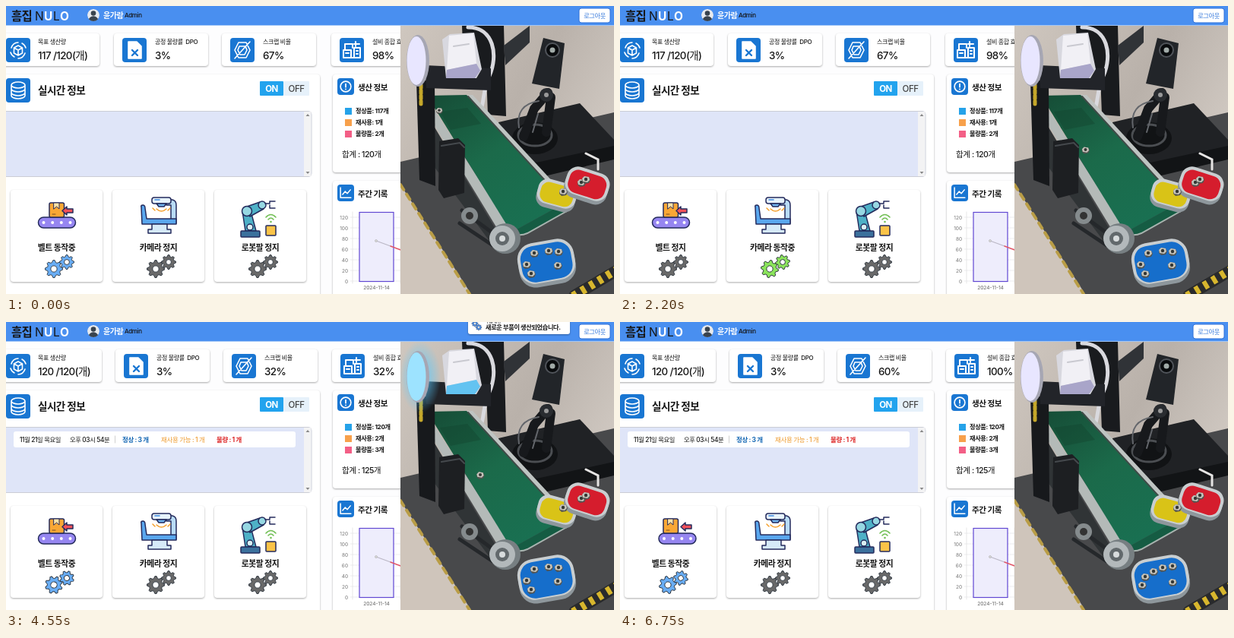
Recreate the animation shown at these times as an HTML page. Size 800 by 379 pixels, loop 6800 ms.

```html
<!DOCTYPE html>
<html lang="ko">
<head>
<meta charset="utf-8">
<style>
html, body { margin: 0; height: 100%; overflow: hidden; background: #fdfdfe; }
svg { display: block; width: 100vw; height: 100vh; }
text { font-family: Inter, "Noto Sans CJK KR", "Noto Sans CJK", sans-serif; letter-spacing: -.045em; fill: #161616; font-weight: 500; }
.b { font-weight: 700; }
.m { text-anchor: middle; }
.axis { font-size: 6.5px; fill: #777; text-anchor: end; letter-spacing: 0; font-weight: 400; }
.card { fill: #fff; filter: drop-shadow(0 1px 1.2px #0005); }
.w { fill: none; stroke: #fff; stroke-width: 1.6; stroke-linejoin: round; stroke-linecap: round; }
.ink { stroke: #242b5c; stroke-width: 1.5; stroke-linejoin: round; stroke-linecap: round; }
</style>
</head>
<body>
<svg id="stage" viewBox="0 0 800 379" preserveAspectRatio="none"></svg>
<script>
const $ = id => document.getElementById(id);
const text = (x, y, size, str, cls = '', extra = '') =>
  `<text x="${x}" y="${y}" font-size="${size}" class="${cls}" ${extra}>${str}</text>`;
const rect = (x, y, w, h, r = 0, attrs = '') =>
  `<rect x="${x}" y="${y}" width="${w}" height="${h}" rx="${r}" ${attrs}/>`;
const path = (d, attrs) => `<path d="${d}" ${attrs}/>`;
const poly = (points, fill, attrs = '') => `<polygon points="${points}" fill="${fill}" ${attrs}/>`;
const dot = (x, y, r, fill, attrs = '') => `<circle cx="${x}" cy="${y}" r="${r}" fill="${fill}" ${attrs}/>`;
const line = (d, color, width, attrs = '') =>
  path(d, `fill="none" stroke="${color}" stroke-width="${width}" stroke-linecap="round" ${attrs}`);
const tile = (x, y, s, glyph) =>
  rect(x, y, s, s, 4, 'fill="#1976d2"') + `<g class="w" transform="translate(${x + s / 2} ${y + s / 2}) scale(${s / 32})">${glyph}</g>`;

function gear(r, teeth) {
  let d = '';
  for (let i = 0; i < teeth * 4; i++) {
    const a = (i - .5) / teeth * Math.PI / 2, k = i % 4 < 2 ? r : r * .76;
    d += `${i ? 'L' : 'M'}${(k * Math.cos(a)).toFixed(2)} ${(k * Math.sin(a)).toFixed(2)}`;
  }
  return path(d + 'Z', 'fill="currentColor" stroke="#29313b" stroke-width=".9"') +
    dot(0, 0, r * .36, '#fff', 'stroke="#29313b" stroke-width=".9"');
}
const gears = (id, x) => `<g id="${id}"><g transform="translate(${x - 4} 346)"><g class="spin">${gear(11.5, 8)}</g></g>
  <g transform="translate(${x + 13} 337)"><g class="spin back">${gear(9.5, 8)}</g></g></g>`;

// Header bar
const header = rect(0, 0, 800, 25.5, 0, 'fill="#498ff0"') +
  text(7, 19, 15.5, '흠집', 'b') + text(38, 18.5, 15.5, 'N', '', 'style="font-weight:400"') +
  text(50, 18.5, 15.5, 'U', 'b', 'style="fill:#fff"') + text(62, 18.5, 15.5, 'L', '', 'style="font-weight:400"') +
  text(71, 18.5, 15.5, 'O', 'b', 'style="fill:#fff"') +
  `<g clip-path="url(#face)">${dot(115, 12, 8, '#e8eaee')}${dot(115, 9.5, 3.3, '#39434e')}<ellipse cx="115" cy="19" rx="6.3" ry="5.7" fill="#39434e"/></g>` +
  text(128, 15.5, 10, '윤가람', 'b', 'style="fill:#fff"') + text(156, 15, 8, 'Admin') +
  rect(754, 3, 41, 19, 3, 'fill="#fff" stroke="#2f71d8"') + text(774.5, 15.5, 8.2, '로그아웃', 'm', 'style="fill:#3478db"');

// Summary cards
const glyphs = [
  path('M0-6L5.5-3V4L0 7L-5.5 4V-3ZM-5.5-3L0 0L5.5-3M0 0V7M-9-3A10 10 0 0 1 0-10M9 4A10 10 0 0 1 0 11M-10 3A10 10 0 0 0-5 9M10-3A10 10 0 0 0 5-9', ''),
  path('M-8-11H3L9-5V11H-8Z', 'fill="#fff"') + path('M-3 0L4 7M4 0L-3 7', 'stroke="#1976d2" stroke-width="2.4"'),
  path('M-5-10H5L10 0L5 10H-5L-10 0ZM-4-5L4-5L6 0L3 6H-3L-6 0ZM10-11L-10 11', ''),
  path('M-11 10V0H-1V10ZM-1 10H11V-3H3V10M-9 0V-8H1V-3M3-8H10M5-11V-5M-8 4H-4M6 1H8M6 5H8', 'stroke-width="2"')
];
const labels = ['목표 생산량', '공정 불량률 &#160;DPO', '스크랩 비율', '설비 종합 효율'];
const summary = [0, 153, 295, 439].map((x, i) => `<g class="sum">${
  rect(i ? x - 11 : -6, 36, i ? 124 : 129, 43, 4, `class="card" ${i ? '' : 'id="first"'}`) + tile(x, 42, 32, glyphs[i]) +
  text(x + (i ? 43 : 42), 50, 8, labels[i]) + text(x + (i ? 43 : 42), 70, 13.4, '', '', `id="val${i}"`)}</g>`).join('');

// Live panel
const live = rect(-6, 90, 419, 300, 4, 'class="card"') +
  tile(0, 95, 32, path('M-9-7A9 4 0 0 1 9-7A9 4 0 0 1-9-7V7A9 4 0 0 0 9 7V-7M-9-2A9 4 0 0 0 9-2M-9 3A9 4 0 0 0 9 3', '')) +
  text(42, 116, 13.6, '실시간 정보', 'b') +
  rect(334, 99, 31, 19, 1, 'fill="#22a3ee"') + rect(365, 99, 34, 19, 1, 'fill="#e6f1fa"') +
  text(349.5, 113, 11.5, 'ON', 'm b', 'style="fill:#fff"') + text(382, 113, 11.5, 'OFF', 'm', 'style="fill:#444"') +
  rect(-4, 138.5, 406, 86, 4, 'fill="#dfe5f8" stroke="#cbcdd5"') + rect(392, 139, 9.5, 85, 0, 'fill="#f3f3f4"') +
  path('M394.5 145L397 142L399.5 145ZM394.5 218L397 221L399.5 218Z', 'fill="#888"') +
  `<g id="log">${rect(10, 144, 371, 21, 3, 'fill="#fff"') + text(18, 157.5, 8.3, '11월 21일 목요일') + text(84, 157.5, 8.3, '오후 03시 54분') +
    line('M143.5 150V159', '#bbb', .7) + text(153, 157.5, 8.5, '정상 : 3 개', 'b', 'style="fill:#1769b5"') +
    text(204, 157.5, 8.5, '재사용 가능 : 1 개', '', 'style="fill:#ee9a2d"') + text(277, 157.5, 8.5, '불량 : 1 개', 'b', 'style="fill:#dd2828"')}</g>`;

// Device icons
const roller = (x, y) => rect(x, y, 49, 14, 7, 'class="ink" fill="#9686f1"') +
  [7, 18.7, 30.3, 42].map(dx => dot(x + dx, y + 7, 2, '#fff')).join('');
const beltIcon = `<g clip-path="url(#beltbox)"><g id="upper">${roller(42.5, 278)}</g><g id="lower">${roller(24, 290.5)}</g>
  <g id="parcel" class="ink">${rect(57, 259, 19.5, 19, 2, 'fill="#f9a735"') + path('M63 259H70V267L66.5 264L63 267Z', 'fill="#fde3a7" stroke-width="1"') + line('M61 274H65', '#7a4f23', 1)}</g>
  <g id="arrow">${path('M74 269.5L80 264V267H88V272H80V275Z', 'class="ink" fill="#f2515a" stroke-width="1.2"')}</g></g>`;
const cameraIcon = `<g class="ink">${path('M211 255H219Q224 256 224 262V286H217V262H211Z', 'fill="#b9dcf6"') +
  path('M178 265Q177 262 180 262Q183 262 183 266L185 280H224V287H179Z', 'fill="#5aa7ee"') +
  path('M192 287H212V294H217V299H187V294H192Z', 'fill="#d6eaf8"')}
  <g id="head">${rect(192, 252, 25, 8, 3, 'fill="#e7f3fc"') + path('M198 260H211L208 264H201Z', 'fill="#72b7f1"') + line('M196 255H202', '#3e8be0', 1.6)}</g></g>
  <g id="rays">${line('M198 267Q204.500 273 211 267M193 266L196 269M216 266L213 269', '#f5a02b', 1.5)}</g>`;
const armIcon = `<g class="ink">${path('M315 296L311 270L321 266L329 296Z', 'fill="#4eb1c7"') +
  path('M314 265L334 258L339 267L321 277Z', 'fill="#4eb1c7"') + dot(317, 270, 6.5, '#96d7e2') + dot(337, 262, 5, '#96d7e2') +
  path('M341 260H347V257H354M347 262V266H354', 'fill="none"') + rect(309, 296, 25, 8, 1, 'fill="#3b719d"') +
  dot(321, 291, 4, '#d9eff2') + rect(342, 289, 13, 13, 1, 'fill="#fbc348"')}</g>` +
  line('M342 278Q348.500 271 355 278M345 281Q348.500 277 352 281', '#72bf55', 1.6) + dot(348.500, 284, 1.3, '#72bf55');
const devices = [66.5, 200.5, 334.5].map((x, i) => rect(x - 60.5, 242, 121, 121, 4, 'class="card"') +
  [beltIcon, cameraIcon, armIcon][i] + text(x, 322, 10.8, '', 'm b', `id="state${i}"`) + gears('gear' + i, x + .5)).join('');

// Production and chart panels
const legend = [['#25a2e9', 139], ['#f7a04b', 154], ['#f35f86', 169]].map(([color, y], i) =>
  rect(446, y - 5, 9, 9, 0, `fill="${color}"`) + text(460, y + 2, 8.2, '', 'b', `id="count${i}"`)).join('');
const panels = rect(430, 90, 130, 129, 4, 'class="card"') +
  tile(436, 95, 22, dot(0, 0, 10, 'none', 'stroke-width="2.4"') + path('M0-5V1M0 5V5.1', 'stroke-width="2.6"')) +
  text(463, 111, 10.6, '생산 정보', 'b') + legend + text(442, 199, 10.6, '', '', 'id="total"') +
  rect(430, 230, 130, 160, 4, 'class="card"') + tile(436, 235, 22, path('M-10-10V9H10M-6 3L-1-3L3 1L9-6', 'stroke-width="2.2"')) +
  text(463, 251, 10.6, '주간 기록', 'b') +
  [...Array(7).keys()].map(i => {
    const y = 362 - i * 14;
    return line(`M453 ${y}H519`, '#e5e5e8', .7) + text(450, y + 2.5, 6.5, i * 20, 'axis');
  }).join('') + line('M456 271V365M519 271V365', '#ddd', .7) +
  rect(465, 271.5, 45, 91, 0, 'fill="#eeedfc" stroke="#6047d2" stroke-width="1.2"') +
  line('M487 309L506 316', '#bbb8c6', 1.3) + line('M506 316L522 322', '#e25163', 1.4) + dot(487, 309, 1.5, '#ddd', 'stroke="#aaa" stroke-width=".6"') +
  text(487.500, 373, 6.5, '2024-11-14', 'm', 'style="fill:#777;letter-spacing:0"');

// Workbench picture
const nut = (x, y) => `<use href="#nut" x="${x}" y="${y}"/>`;
const tray = (x, y, w, h, color, turn) => `<g transform="translate(${x} ${y}) rotate(${turn})">${
  rect(-w / 2, -h / 2 + 5, w, h, h * .4, 'fill="#8e979c"') + rect(-w / 2, -h / 2, w, h, h * .4, 'fill="#c9ced0"') +
  rect(-w / 2 + 4, -h / 2 + 4, w - 8, h - 6, h * .32, `fill="${color}"`)}</g>`;
const bench = `<g clip-path="url(#photo)">` + rect(519, 26, 281, 353, 0, 'fill="url(#wall)"') +
  poly('519,205 800,140 800,379 607,379 519,236', '#48494b') + poly('519,235 612,379 519,379', '#cfc5bb') +
  line('M519 235L610 379', '#b99d46', 4, 'stroke-dasharray="8 7"') +
  line('M748 381L802 349', '#292a2c', 15) + line('M746 382L804 347', '#d7b62e', 11, 'stroke-dasharray="6 7" style="stroke-linecap:butt"') +
  poly('648,153 755,128 800,176 800,196 698,218 650,182', '#202225') + poly('650,181 698,206 800,184 800,202 700,226 650,194', '#121416') +
  line('M763 194L779 202V215', '#e6e5e4', 3) +
  poly('600,26 655,26 658,145 634,143 632,90 602,77', '#191b1e') + poly('655,52 689,26 689,48 657,78', '#303337') +
  `<ellipse cx="696" cy="174" rx="30" ry="21" fill="#111315"/><ellipse cx="696" cy="170" rx="22" ry="14" fill="none" stroke="#4b4e52" stroke-width="3"/>` +
  line('M681 172L695 135L713 114M711 166L717 120', '#17191c', 12) + line('M675 160Q670 130 701 125M693 166L700 142', '#63666b', 2) +
  dot(711, 117, 9, '#292c30') + dot(711, 117, 3, '#999') +
  poly('707,42 735,49 728,109 692,102', '#222529') + dot(719, 58, 9, '#090b0d', 'stroke="#50545a" stroke-width="2"') + dot(719, 58, 3.5, '#a1aba8') +
  line('M608 28C642 28 648 65 636 92S632 137 617 142', '#d9d9de', 5) +
  poly('549,133 558,128 667,298 658,312', '#b4bab8') + poly('554,143 651,305 639,313 557,203', '#303436') +
  poly('603,117 614,117 746,260 737,272', '#bfc4c2') + poly('554,118 606,117 736,259 665,298', 'url(#belt)') +
  line('M608 119L738 261', '#3e4b47', 2) +
  poly('571,139 607,134 625,155 585,163', '#12452f', 'opacity=".45"') +
  path('M665 298Q675 304 686 299L736 271Q743 266 736 259', 'fill="#155c43" stroke="#a9b4b0" stroke-width="2"') +
  poly('540,98 564,98 565,237 544,229', '#17191c') + line('M546 104V132', '#c4a72a', 5, 'stroke-dasharray="4 3"') +
  poly('551,78 638,82 638,111 553,108', '#222429') + poly('570,178 595,174 604,183 603,246 576,253 569,242', '#1d1f22') + line('M573 184L597 180L603 186', '#45494d', 2) +
  line('M600 269L638 297M597 286L645 318', '#25282b', 5) + dot(610, 276, 11, '#858b8d') + dot(610, 276, 5, '#333') +
  dot(657, 306, 20, '#777f82') + dot(653, 306, 17, '#b3b9bb') + dot(653, 306, 9, '#62696c') + dot(653, 306, 4, '#d8dcdd') +
  `<ellipse id="glow" cx="545" cy="72" rx="27" ry="48" fill="url(#halo)"/>
  <ellipse cx="542" cy="72" rx="15" ry="34" fill="#a6a6b3"/><ellipse id="ring" cx="540" cy="72" rx="12.5" ry="32"/>` +
  poly('574,44 584,37 616,35 626,83 619,95 579,95', '#d8d8df') + poly('583,39 615,36 619,76 580,84', '#f1f0f5') +
  poly('580,84 619,76 624,85 617,95 579,95', '#a9a5c9', 'id="lens"') + line('M589 53L609 50', '#c9c9d0', 2) +
  tray(725, 247, 52, 33, '#d9c317', 15) + tray(765, 234, 58, 37, '#d51d2d', 18) + tray(711, 336, 75, 54, '#166ecb', -10) +
  nut(733, 245) + nut(757, 233) + nut(763, 229) +
  `<g id="before">${nut(695, 326) + nut(714, 323) + nut(727, 324) + nut(685, 341) + nut(691, 353) + nut(726, 342)}</g>
  <g id="after">${nut(691, 336) + nut(702, 329) + nut(714, 324) + nut(727, 322) + nut(687, 347) + nut(727, 343)}</g>` +
  `<g id="part">${nut(0, 0)}</g></g>`;

const toast = `<g id="toast">${rect(608, 1, 134, 23, 3, 'class="card"')}<g color="#4d8fe8"><g transform="translate(617 10) scale(.38)">${gear(11, 8)}</g><g transform="translate(622 15) scale(.4)">${gear(10, 8)}</g></g>${
  text(631, 8.5, 5.5, '부품 생산') + text(631, 18, 8.2, '새로운 부품이 생산되었습니다.', 'b')}</g>`;

$('stage').innerHTML = `<defs>
  <clipPath id="photo">${rect(519, 26, 281, 353)}</clipPath><clipPath id="face">${dot(115, 12, 8, '')}</clipPath>
  <clipPath id="beltbox">${rect(32.5, 250, 69, 58)}</clipPath>
  <linearGradient id="wall" x2="1" y2=".7"><stop stop-color="#cfc7bf"/><stop offset=".5" stop-color="#b9b1aa"/><stop offset="1" stop-color="#dad3cc"/></linearGradient>
  <linearGradient id="belt" x2=".7" y2="1"><stop stop-color="#164c36"/><stop offset=".5" stop-color="#1b6a4a"/><stop offset="1" stop-color="#197052"/></linearGradient>
  <radialGradient id="halo"><stop offset=".4" stop-color="#58caff" stop-opacity=".8"/><stop offset="1" stop-color="#58caff" stop-opacity="0"/></radialGradient>
  <g id="nut">${poly('-5,-2 -2,-5 4,-4 6,0 4,4 -2,5 -5,2', '#535451')}${poly('-5,-2 -2,-5 4,-4 5,0 2,3 -4,2', '#c6c4bb')}${dot(0, -1, 2.2, '#343734')}</g>
  </defs>` + rect(0, 0, 800, 379, 0, 'fill="#fdfdfe"') + summary + live + devices + panels + header + bench + toast;

// Interpolates keys of the form [time, value].
function track(t, ...keys) {
  const i = keys.findIndex(k => k[0] > t);
  if (i < 1) return keys[i ? keys.length - 1 : 0][1];
  const [t0, a] = keys[i - 1], [t1, b] = keys[i];
  return a + (b - a) * (t - t0) / (t1 - t0);
}
const move = (id, x, y = 0, more = '') => $(id).setAttribute('transform', `translate(${x} ${y}) ${more}`);
const show = (id, on) => $(id).setAttribute('opacity', +on);
const write = (id, value) => { if ($(id).textContent !== value) $(id).textContent = value; };

const LOOP = 6800, STOP = 1950, START = 4100, UPDATE = 4050, LOG = 4400, RATES = 5000;
const sums = [...document.querySelectorAll('.sum')];

function render(t) {
  const running = t < STOP || t >= START, scanning = !running, updated = t >= UPDATE;

  sums.forEach((el, i) => el.setAttribute('transform', `translate(${updated ? [0, 2, 2, 1][i] : 0} 0)`));
  $('first').setAttribute('width', updated ? 132 : 129);
  const rates = t >= RATES ? ['60%', '100%'] : updated ? ['32%', '32%'] : ['67%', '98%'];
  [(updated ? 120 : 117) + ' /120(개)', '3%', ...rates].forEach((v, i) => write('val' + i, v));
  const counts = updated ? [120, 2, 3] : [117, 1, 2];
  ['정상품', '재사용', '불량품'].forEach((name, i) => write('count' + i, `${name}: ${counts[i]}개`));
  write('total', `합계 : ${updated ? 125 : 120}개`);
  show('log', t >= LOG);

  [['벨트', running, '#69adf4'], ['카메라', scanning, '#8be45b'], ['로봇팔', false, '']].forEach(([name, on, color], i) => {
    write('state' + i, `${name} ${on ? '동작중' : '정지'}`);
    $('gear' + i).style.color = on ? color : '#696969';
    const turn = on ? t * .045 : 0;
    $('gear' + i).querySelectorAll('.spin').forEach((g, k) => g.setAttribute('transform', `rotate(${k ? -turn : turn})`));
  });

  // The belt icon hands its parcel from the upper roller to the lower one.
  const u = running ? (t < STOP ? t : t - START) % 2000 : 0;
  move('upper', track(u, [550, 0], [650, 8.5], [950, 21], [1150, 21], [1400, 17], [1500, 17], [1900, 0]));
  move('lower', track(u, [700, -52], [950, 2], [1150, 2], [1400, 0], [1500, 0], [1800, -52]));
  move('parcel', u < 1450 ? track(u, [1150, 0], [1220, 0], [1390, -46]) : track(u, [1500, 46], [1900, 0]),
    u < 1450 ? track(u, [1150, 0], [1220, 12]) : 0);
  move('arrow', track(u, [550, 0], [650, 6], [1000, 10], [1150, 10], [1400, 9], [1500, 9], [1900, 0]));

  const scan = scanning ? (1 - Math.cos((t - 2150) / 950 * Math.PI)) / 2 : 0;
  move('head', scan * 8);
  move('rays', scan * 5);
  show('rays', 1 - scan * .8);

  const x = track(t, [0, 570], [1400, 600], [STOP, 612.5], [START, 612.5], [4550, 624], [5250, 645], [6400, 688], [6550, 702]);
  const y = track(t, [0, 138], [1400, 174], [STOP, 190], [START, 190], [4550, 202], [5250, 227], [6400, 285], [6550, 329]);
  move('part', x, y, `scale(${track(y, [138, .8], [285, 1.1])})`);
  show('part', t < 6550);
  show('before', t < 6550);
  show('after', t >= 6550);

  const cyan = track(t, [3950, 0], [4250, 1], [4700, 1], [5250, .6], [6200, 0]);
  $('ring').setAttribute('fill', `rgb(${232 - 75 * cyan},${230 - 3 * cyan},255)`);
  $('lens').setAttribute('fill', `rgb(${169 - 70 * cyan},${165 + 30 * cyan},${201 + 40 * cyan})`);
  show('glow', 0);
  $('glow').setAttribute('opacity', cyan * .7);

  move('toast', 0, track(t, [4400, -26], [4550, -8], [4650, 0], [6400, 0], [6600, -27]));
}

function frame() {
  render(Math.floor(performance.now() / 50) * 50 % LOOP);
  requestAnimationFrame(frame);
}
frame();
</script>
</body>
</html>
```
